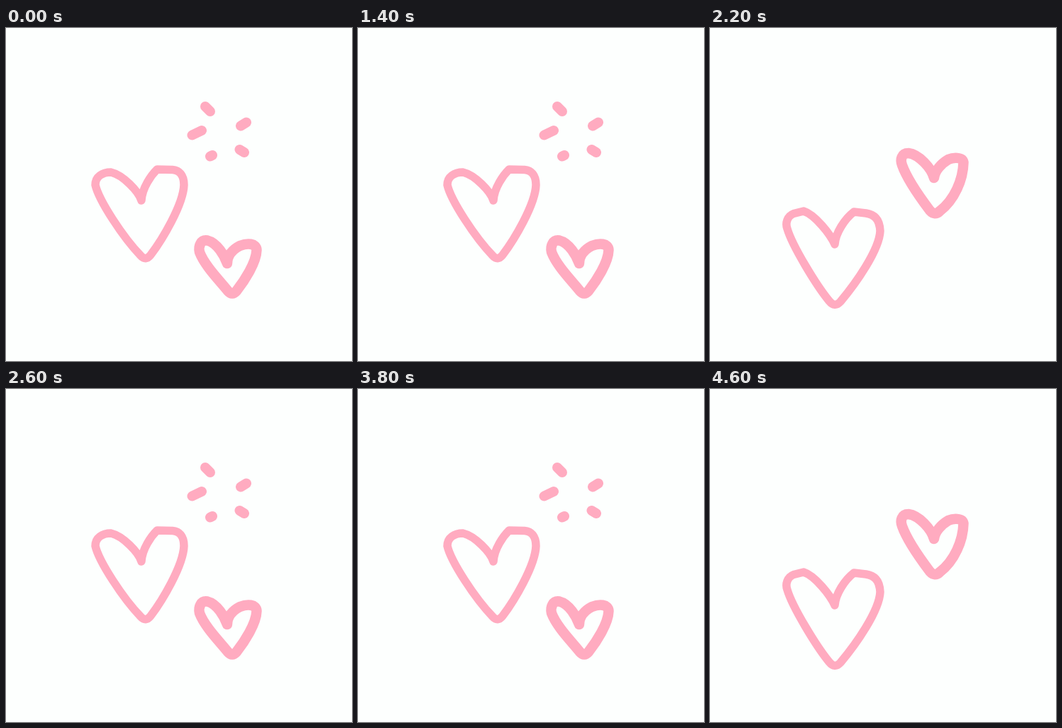
These frames come from a looping animation (488x471 px, 5000 ms). An HTML page without scripts:

```html
<!DOCTYPE html>
<html lang="en">
<head>
<meta charset="utf-8">
<title>Popping hearts</title>
<style>
  html, body { margin: 0; width: 100%; height: 100%; overflow: hidden; background: #fdfffe; }
  svg { display: block; width: 100%; height: 100%; }
  .ink { fill: none; stroke: #ffabc0; stroke-width: 14.5; stroke-linecap: round; stroke-linejoin: round; }
  .big { stroke-width: 11.5; }
  .pose { opacity: 0; animation: 5s step-end infinite; }
  .rest { animation-name: rest; }
  .burst { animation-name: burst; }
  .apart { animation-name: apart; }
  @keyframes rest {
    0%, 28%, 52%, 76% { opacity: 1; }
    16%, 40%, 64%, 88%, 100% { opacity: 0; }
  }
  @keyframes burst {
    0%, 28%, 76%, 100% { opacity: 0; }
    16%, 64% { opacity: 1; }
  }
  @keyframes apart {
    0%, 52% { opacity: 0; }
    40%, 88%, 100% { opacity: 1; }
  }
</style>
</head>
<body>
<svg viewBox="0 0 488 471" class="ink">
  <defs>
    <path id="small" d="M312 333C308 322 298 304 284 300.500C275 299 271 308 273 317C280 336 302 358 313 372Q319 379 325 372C336 358 353 332 353.500 314C353 304 340 304 330 308C320 313 312 322 312 333Z"/>
  </defs>

  <g class="pose rest">
    <path class="big" d="M191 244C187 231 165 208 148 204C136 204 126 210 126 222C131 244 165 296 190 322Q197 330 204 321C220 300 250 250 251 222C251 208 244 201 235 200.500L213 200C205 208 192 226 191 244Z"/>
    <use href="#small"/>
    <path stroke-width="14" d="M281 111L288 118M262.500 151.500L276 145M331 138.500L339 133.500M329.500 172L336 176M288 181.500L291 180"/>
  </g>

  <g class="pose burst">
    <use href="#small" x="-4" y="-59"/>
    <path d="M182 95L184 115M253 104L237 131M87 142L131 155M108 207L121.500 200M252 197.500L286 192M160 241L147 277M208.500 232.500L213.500 238"/>
  </g>

  <g class="pose apart">
    <path class="big" d="M176 306C170 292 148 264 132 259L118 262.500C109 266 106 276 109 284C116 308 150 364 168 386Q176 396 184 387C205 362 239 314 240 287C239 269 231 264 220 262L203 260C190 270 177 290 176 306Z"/>
    <path d="M316 212C312 198 295 179 280 177C270 177 268 186 271 194C278 214 298 242 310 258Q317 266 324 259C345 243 357 214 357.500 190C356 182 343 183 336 186C326 192 317 202 316 212Z"/>
  </g>
</svg>
</body>
</html>
```
